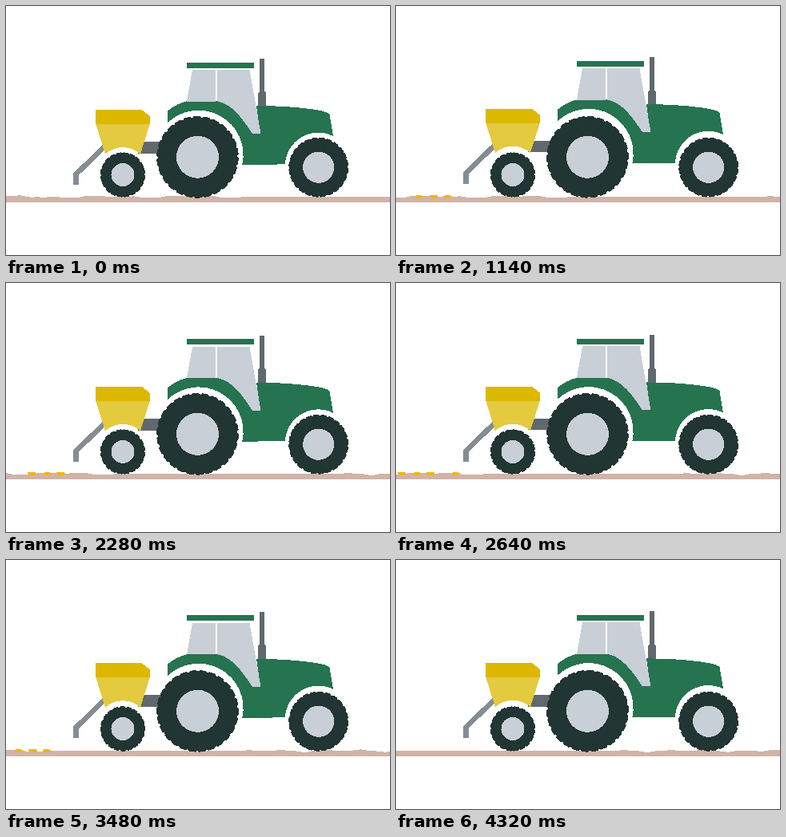
An HTML page for the animation above (4.35 s loop, 480 px wide and 312 px high).

```html
<!DOCTYPE html>
<html lang="en">
<head>
<meta charset="utf-8">
<title>Tractor sowing</title>
<style>
  html, body { margin: 0; width: 100%; height: 100%; overflow: hidden; background: #fff; }
  svg { display: block; width: 100vw; height: 100vh; shape-rendering: crispEdges; }
  .green { fill: #267350; }
  .steel { fill: #5f696e; }
  .pale { fill: #c8cfd6; }
  .tyre { fill: #213533; }
  .soil { fill: #d1b3a7; }
  .seed { fill: #f3b50c; }
</style>
</head>
<body>
<svg viewBox="0 0 480 312" xmlns="http://www.w3.org/2000/svg">
  <path id="soil" class="soil"/>
  <g id="seeds"></g>

  <g id="planter">
    <path class="steel" d="M169 170.300H194V184.800H165Z"/>
    <path d="M87.500 224V210.800L126 173.300" fill="none" stroke="#858d93" stroke-width="6.500"/>
    <path fill="#e3ca3f" d="M112 147.300H180L168 185.500A33 33 0 0 0 124 185.500Z"/>
    <path fill="#dcb800" d="M112 130.300H170L180 138.300V148.300H113L112 146.300Z"/>
  </g>

  <g id="tractor">
    <path class="steel" d="M317 66H323V107L325 109V127H315V109L317 107Z"/>
    <path class="green" d="M202 146.200V131.500Q213 122.500 226 119.300H264C283 122.500 296 142 308 160H318L313 125
      Q350 125 380 129Q403 132 404.500 136L409 163A41.500 41.500 0 0 0 349 198.400L295.300 199A56 56 0 0 0 202 146.200Z"/>
    <path class="pale" d="M233 80H261.500V119.500H226Z"/>
    <path class="pale" d="M264 80H304.500L318.500 160H308C296 142 283 122.500 264 119.300Z"/>
    <rect class="green" x="226" y="70.500" width="84" height="7"/>
  </g>

  <g id="wheels"></g>
</svg>
<script>
  const LOOP = 4350, STEP = 30, BOB = 450;
  const SPEED = 0.07; // ground travel, px per ms
  const $ = id => document.getElementById(id);

  function add(parent, tag, attrs) {
    const el = document.createElementNS('http://www.w3.org/2000/svg', tag);
    for (const key in attrs) el.setAttribute(key, attrs[key]);
    return parent.appendChild(el);
  }

  const place = (el, x, y, extra = '') =>
    el.setAttribute('transform', `translate(${x} ${y}) ${extra}`);

  // Closed outline with wide lugs and narrow, shallow notches.
  function treadPath(r, lugs, depth) {
    const profile = [[0, depth], [0.12, 0], [0.74, 0], [0.86, depth]];
    const points = [];
    for (let i = 0; i < lugs; i++) {
      for (const [part, cut] of profile) {
        const a = (i + part) / lugs * 2 * Math.PI;
        points.push(`${((r - cut) * Math.cos(a)).toFixed(2)} ${((r - cut) * Math.sin(a)).toFixed(2)}`);
      }
    }
    return `M${points.join('L')}Z`;
  }

  const wheels = [
    { x: 146, y: 211.5, r: 28.2, hub: 14.5, lugs: 20, depth: 1.1 },
    { x: 239.5, y: 189.3, r: 51.4, hub: 26.5, lugs: 26, depth: 1.5 },
    { x: 390.7, y: 202.2, r: 37.5, hub: 19.6, lugs: 24, depth: 1.2 }
  ];
  for (const w of wheels) {
    w.el = add($('wheels'), 'g', {});
    add(w.el, 'path', { class: 'tyre', d: treadPath(w.r, w.lugs, w.depth) });
    add(w.el, 'circle', { class: 'pale', r: w.hub });
  }

  // Bumpy soil with a smoother stretch in the middle.
  function soilPath() {
    const ramp = (x, edge) => 1 / (1 + Math.exp((edge - x) / 12));
    let d = 'M-10 246';
    for (let x = -10; x <= 800; x += 3) {
      const rough = 0.12 + 0.88 * (1 - ramp(x, 310) + ramp(x, 550));
      const bump = Math.sin(x * 0.13) + Math.sin(x * 0.057 + 1) + 0.5 * Math.sin(x * 0.31 + 2);
      d += `L${x} ${(239.2 - rough * (0.2 + 0.75 * bump)).toFixed(2)}`;
    }
    return d + 'L800 246Z';
  }
  $('soil').setAttribute('d', soilPath());

  const seedShapes = [
    'M-5.5 .3L-3 -1.800 2 -2 5.500 -.3 3 1.800 -2 2Z',
    'M-6 -1.200L-2 -2.200 4 -1.800 6 .5 2.500 2.200 -3 1.600Z'
  ];
  const seeds = [108, 127, 144, 192, 211, 228, 259, 277, 294].map((x, i) => ({
    x, el: add($('seeds'), 'path', { class: 'seed', d: seedShapes[i % 2] })
  }));
  const DROP = 90, LAND = 82;

  function pose(t) {
    const shift = t * SPEED;
    const lift = 1 - Math.abs(1 - 2 * (t % BOB) / BOB);
    place($('tractor'), 0, -2 * lift);
    place($('planter'), 0, -1.6 * lift);
    place($('soil'), -shift, 0);

    for (const w of wheels) {
      place(w.el, w.x, w.y, `rotate(${shift / w.r * 180 / Math.PI})`);
    }
    for (const { x, el } of seeds) {
      const at = x - shift;
      const fall = Math.min(1, (DROP - at) / (DROP - LAND));
      el.setAttribute('visibility', fall > 0 ? 'visible' : 'hidden');
      place(el, Math.min(at, 87), 222 + 16.8 * fall * fall);
    }
  }

  // One clock for all parts, since the bobbing is cut mid-cycle by the loop.
  const start = performance.now();
  function tick() {
    const t = (performance.now() - start) % LOOP;
    pose(Math.floor(t / STEP) * STEP);
    requestAnimationFrame(tick);
  }
  tick();
</script>
</body>
</html>
```
